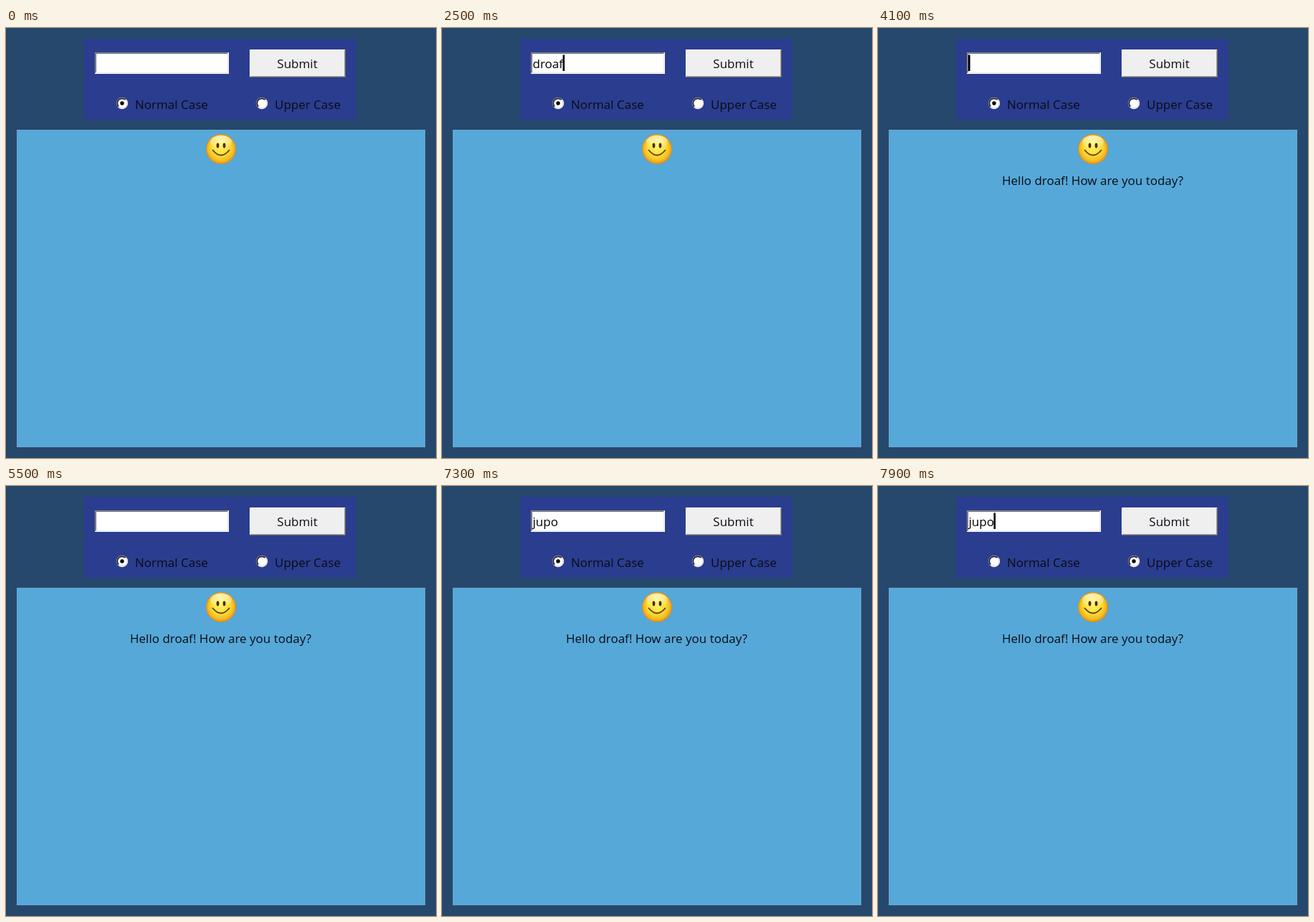
An HTML page with a canvas for the animation above (8 s loop, 600 px wide and 600 px high).

```html
<!DOCTYPE html>
<html lang="en">
<head>
<meta charset="utf-8">
<title>Greeting form</title>
<style>
  html, body { margin: 0; width: 100%; height: 100%; overflow: hidden; background: #26486c; }
  canvas { display: block; }
</style>
</head>
<body>
<canvas id="stage" width="600" height="600"></canvas>
<script>
const ctx = document.getElementById('stage').getContext('2d');
const LOOP = 8000;
const FIRST = 'droaf', SECOND = 'jupo';

// [start time, number of letters in the field]
const firstTyping = [[1400, 1], [1600, 2], [1700, 3], [2000, 4], [2100, 5],
                     [3700, 4], [3800, 3], [3900, 2], [4000, 1], [4100, 0]];
const secondTyping = [[5600, 1], [5700, 2], [6100, 3], [6300, 4]];

function rect(x, y, w, h, color) {
  ctx.fillStyle = color;
  ctx.fillRect(x, y, w, h);
}

function text(str, x, y, align = 'left', color = '#080c14') {
  ctx.font = '17px "Open Sans", "Noto Sans", sans-serif';
  ctx.textAlign = align;
  ctx.fillStyle = color;
  ctx.fillText(str, x, y);
}

function arc(x, y, r, from, to, color, width) {
  ctx.beginPath();
  ctx.arc(x, y, r, from, to);
  ctx.strokeStyle = color;
  ctx.lineWidth = width;
  ctx.stroke();
}

function oval(x, y, rx, ry, fill) {
  ctx.beginPath();
  ctx.ellipse(x, y, rx, ry, 0, 0, 2 * Math.PI);
  ctx.fillStyle = fill;
  ctx.fill();
}

// Two-line bevel: outer and inner colours for the top-left and bottom-right sides
function bevel(x, y, w, h, face, topOuter, topInner, lowOuter, lowInner) {
  rect(x, y, w, h, lowOuter);
  rect(x, y, w - 1, h - 1, topOuter);
  rect(x + 1, y + 1, w - 2, h - 2, lowInner);
  rect(x + 1, y + 1, w - 3, h - 3, topInner);
  rect(x + 2, y + 2, w - 4, h - 4, face);
}

function field(value, caret) {
  bevel(124, 34, 187, 30, '#fff', '#8d8f98', '#696969', '#fff', '#e3e3e3');
  text(value, 126.5, 55.5, 'left', '#000');
  if (caret) rect(126 + ctx.measureText(value).width, 37.5, 2.6, 22.5, '#000');
}

function button(pressed) {
  if (pressed) {
    bevel(340, 30, 135, 39, '#f0eff0', '#a0a0a0', '#696969', '#fff', '#e3e3e3');
    text('Submit', 408, 57, 'center');
  } else {
    bevel(340, 30, 134, 39, '#f0eff0', '#fff', '#f6f5f6', '#696969', '#a0a0a0');
    text('Submit', 406.5, 55.5, 'center');
  }
}

function radio(x, label, selected) {
  const y = 105, a = Math.PI / 4;
  oval(x, y, 7.5, 7.5, '#fff');
  arc(x, y, 7.6, 3 * a, 7 * a, '#8b8d94', 1.2);
  arc(x, y, 6.6, 3 * a, 7 * a, '#16181f', 1.5);
  arc(x, y, 7.6, -a, 3 * a, '#f4f4f6', 1.2);
  arc(x, y, 6.6, -a, 3 * a, '#dcdce2', 1);
  if (selected) oval(x, y, 2.7, 2.7, '#000');
  text(label, x + 18, 112.5);
}

function smiley() {
  const skin = ctx.createRadialGradient(299, 162, 3, 300, 169, 21);
  skin.addColorStop(0, '#fff26a');
  skin.addColorStop(0.55, '#fbdc35');
  skin.addColorStop(0.85, '#f3b722');
  skin.addColorStop(1, '#d98a1c');
  oval(300, 169, 21, 21, skin);
  const shine = ctx.createLinearGradient(0, 149, 0, 168);
  shine.addColorStop(0, 'rgba(255,255,240,.8)');
  shine.addColorStop(1, 'rgba(255,255,240,0)');
  oval(300, 159, 15, 9, shine);
  oval(295.5, 164, 1.9, 3.4, '#4a2c08');
  oval(304.5, 164, 1.9, 3.4, '#4a2c08');
  ctx.beginPath();
  ctx.moveTo(288.5, 170.5);
  ctx.quadraticCurveTo(300, 184.5, 311.5, 170.5);
  ctx.strokeStyle = '#6a420c';
  ctx.lineWidth = 1.9;
  ctx.lineCap = 'round';
  ctx.stroke();
  ctx.lineCap = 'butt';
}

function lettersAt(typing, t) {
  let count = 0;
  for (const [start, n] of typing) if (t >= start) count = n;
  return count;
}

function draw(t) {
  const value = t < 5000 ? FIRST.slice(0, lettersAt(firstTyping, t))
                         : SECOND.slice(0, lettersAt(secondTyping, t));
  // The caret blinks 600 ms on, 300 ms off once the field has focus
  const caret = t >= 400 && (t - 400) % 900 < 600;
  const upper = t >= 7900;

  rect(0, 0, 600, 600, '#26486c');
  rect(109, 15, 380, 113, '#2b3d8f');
  rect(15, 142, 570, 443, '#6aa9cd');
  rect(16, 143, 568, 441, '#56a8d8');

  field(value, caret);
  button(t >= 3400 && t < 3600);
  if (t >= 7800 && !upper) rect(345, 86, 129, 40, '#f0f0f0');
  radio(162, 'Normal Case', !upper);
  radio(357, 'Upper Case', upper);
  smiley();
  if (t >= 3600) text(`Hello ${FIRST}! How are you today?`, 299.5, 219, 'center');
}

const begin = performance.now();
function frame() {
  draw((performance.now() - begin) % LOOP);
  requestAnimationFrame(frame);
}
frame();
</script>
</body>
</html>
```
